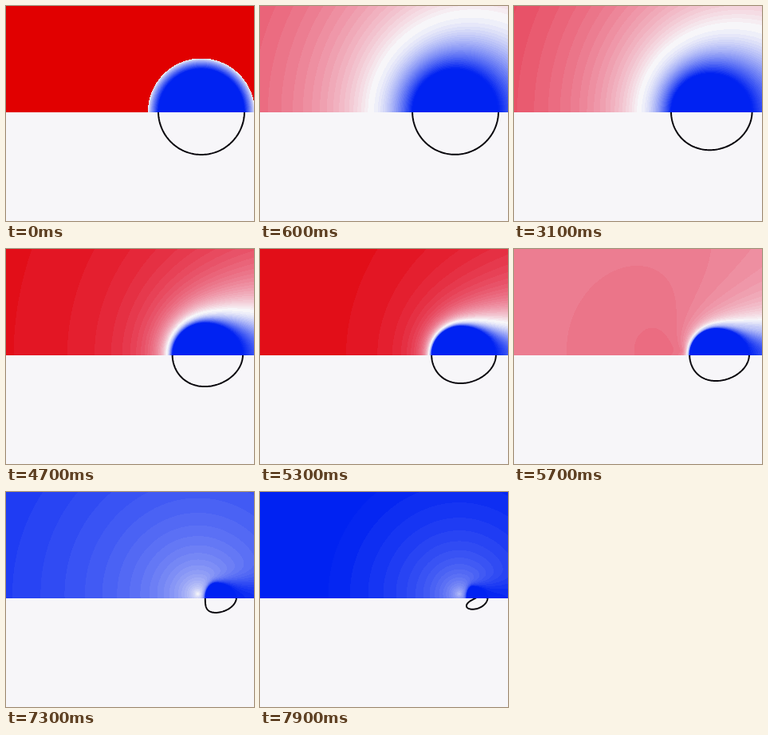
An HTML page with a canvas for the animation above (8 s loop, 311 px wide and 269 px high).

```html
<!DOCTYPE html>
<html lang="en">
<head>
<meta charset="utf-8">
<title>Shrinking body in a flow</title>
<style>
  html, body { margin: 0; width: 100%; height: 100%; overflow: hidden; background: #f7f6f9; }
  canvas { display: block; width: 311px; height: 269px; }
</style>
</head>
<body>
<canvas id="stage" width="311" height="269"></canvas>
<script>
const W = 311, H = 269, AXIS = 132, ROWS = AXIS + 1;
const LOOP = 8000, STEP = 100, LAST = LOOP - STEP;
const ctx = document.getElementById('stage').getContext('2d');
const field = ctx.createImageData(W, ROWS);

const mix = (a, b, p) => a + (b - a) * p;
const limit = (v, low, high) => Math.max(low, Math.min(high, v));
const ramp = (p, from, to) => limit((p - from) / (to - from), 0, 1);

// Lower half of the body: it shrinks to the right and finally curls into a hook.
function outline(p) {
  const curl = p ** 16;
  const left = 191 + 68 * p ** 2.6 + 12 * curl;
  const right = 299 - 13.5 * p ** 3.7;
  const height = 54 * (1 - .77 * p ** 2.1);
  const bend = 3 * p + 6.3 * curl, hook = 4.5 * curl;
  const mid = (left + right) / 2 - bend, half = (right - left) / 2;
  return Array.from({ length: 91 }, (_, i) => {
    const f = i * Math.PI / 90;
    return [mid + half * Math.cos(f) + bend * Math.cos(2 * f),
            height * Math.sin(f) + hook * Math.sin(2 * f)];
  });
}

// -1 blue, 0 white, 1 red, in narrow contour bands
function paint(i, value) {
  const u = limit(Math.round(value / .035) * .035, -1, 1), m = Math.abs(u), d = field.data;
  if (u > 0) {
    d[i] = 247 - 22 * m;
    d[i + 1] = 246 * (1 - m);
    d[i + 2] = 249 * (1 - m) ** .8;
  } else {
    d[i] = 247 * (1 - m);
    d[i + 1] = 246 - 212 * m;
    d[i + 2] = 249 - 7 * m;
  }
  d[i + 3] = 255;
}

// Value against distance from the body, in units of the boundary layer
function layerValue(q, initial) {
  if (q < 1) return -((1 - q) ** (initial ? .8 : 1.8));
  return initial ? 1 : Math.tanh(.5 * Math.log(q));
}

function drawField(p, points) {
  const initial = p === 0;
  const thinning = 1 / (1 + Math.exp(-16 * (p - .49)));
  const layer = initial ? 13 : mix(70, 3.5, thinning);
  const skew = initial ? 0 : mix(.3, .97, thinning);
  const cooling = ramp(p, .67, .835), fading = ramp(p, .835, 1);
  const peak = mix(.35, -.25, fading), falloff = mix(.236, .2, fading);

  const [cx, height] = points.reduce((a, b) => b[1] > a[1] ? b : a);
  const minX = Math.min(...points.map(([x]) => x));
  const leftR = cx - minX, rightR = points[0][0] - cx;
  const peakX = minX - 9, peakY = AXIS - 5;

  for (let y = 0, i = 0; y < ROWS; y++) {
    for (let x = 0; x < W; x++, i += 4) {
      const dx = x + .5 - cx, dy = AXIS - y;
      const r = Math.hypot(dx, dy), cos = dx / r;
      const edge = 1 / Math.hypot(cos / (dx < 0 ? leftR : rightR), dy / r / height);
      const q = (r - edge) * (1 - skew * cos) / layer;
      let u = -1;
      if (q > 0) {
        const far = Math.hypot(x + .5 - peakX, y - peakY);
        const glow = peak - falloff * Math.log(1 + far / 4);
        const cold = Math.max(-1, (glow + 1) * (1 - Math.exp(-q)) - 1);
        u = mix(layerValue(q, initial), cold, cooling);
      }
      paint(i, u);
    }
  }
  ctx.putImageData(field, 0, 0);
}

function draw(p) {
  const points = outline(p);
  ctx.fillStyle = '#f7f6f9';
  ctx.fillRect(0, 0, W, H);
  ctx.beginPath();
  points.forEach(([x, y]) => ctx.lineTo(x, AXIS + y));
  ctx.lineWidth = 2;
  ctx.strokeStyle = '#08060c';
  ctx.stroke();
  drawField(p, points);
}

const start = performance.now();
let shown = -1;
function tick() {
  const t = Math.floor((performance.now() - start) % LOOP / STEP) * STEP;
  if (t !== shown) draw((shown = t) / LAST);
  requestAnimationFrame(tick);
}
tick();
</script>
</body>
</html>
```
